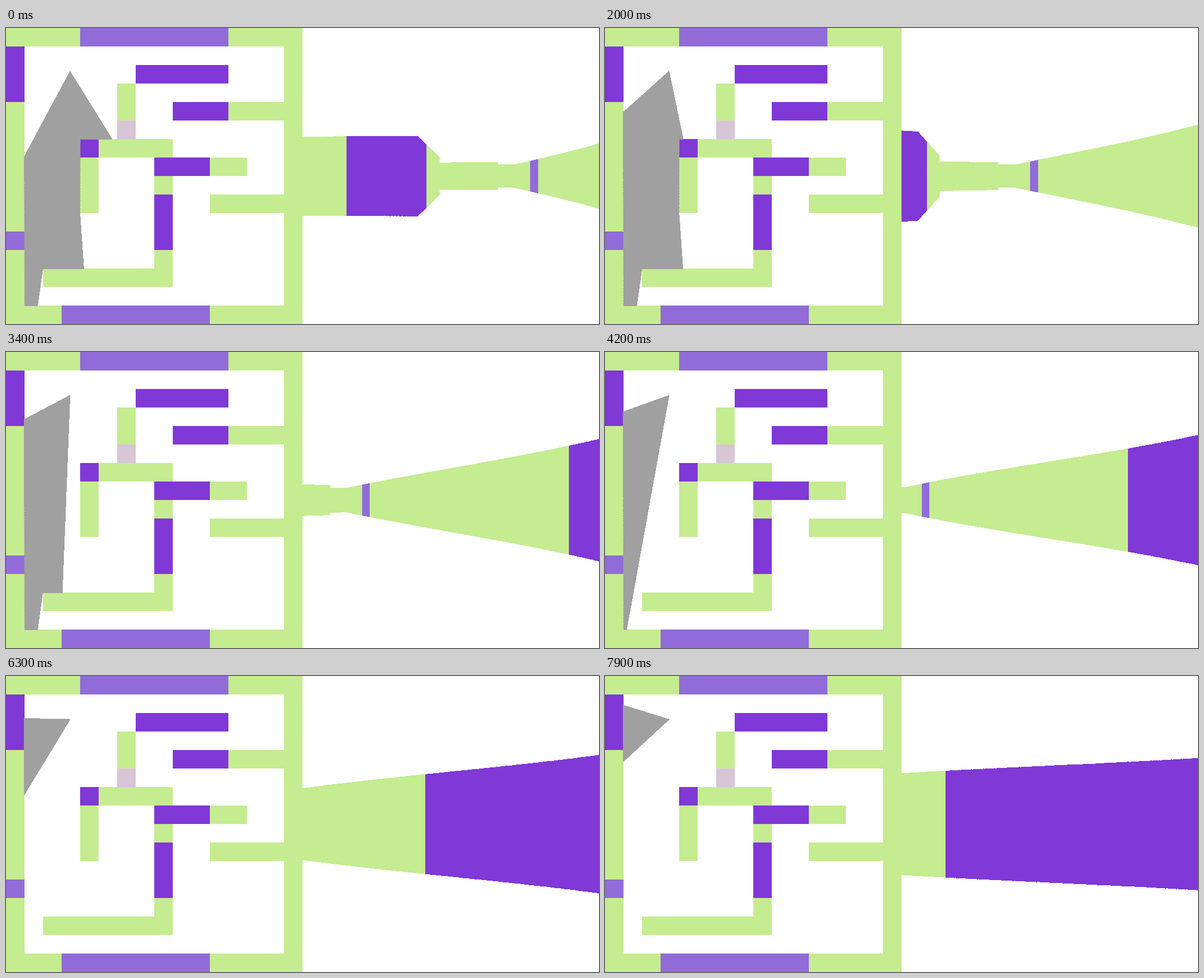
These frames come from a looping animation (1024x512 px, 8000 ms). An HTML page with a canvas:

```html
<!DOCTYPE html>
<html lang="en">
<head>
<meta charset="utf-8">
<title>Raycaster</title>
<style>
html, body { margin: 0; width: 100%; height: 100%; overflow: hidden; background: #fff; }
canvas { display: block; }
</style>
</head>
<body>
<canvas id="view" width="1024" height="512"></canvas>
<script>
const W = 1024, H = 512, HALF = W / 2, CELL = 32, SIZE = 16;
const STEP_MS = 100, STEPS = 80, FOV = Math.PI / 3;
const player = { x: 3.456, y: 2.345, angle: 1.523 };

const map = [
  '0000222222220000',
  '1              0',
  '1      11111   0',
  '1     0        0',
  '0     0  1110000',
  '0     3        0',
  '0   10000      0',
  '0   0   11100  0',
  '0   0   0      0',
  '0   0   1  00000',
  '0       1      0',
  '2       1      0',
  '0       0      0',
  '0 0000000      0',
  '0              0',
  '0002222222200000'
].join('');

const rgb = (r, g, b) => (255 << 24 | b << 16 | g << 8 | r) >>> 0;
const walls = [rgb(197, 236, 144), rgb(128, 56, 214), rgb(145, 108, 216), rgb(216, 197, 214)];
const GRAY = rgb(160, 160, 160), WHITE = rgb(255, 255, 255);

const ctx = document.getElementById('view').getContext('2d');
const image = ctx.createImageData(W, H);
const pixels = new Uint32Array(image.data.buffer);

function fill(buf, x, y, w, h, color) {
  const bottom = Math.min(H, y + h);
  for (let row = Math.max(0, y); row < bottom; row++) {
    buf.fill(color, row * W + x, row * W + x + w);
  }
}

// The floor plan never changes, so it is painted once.
const plan = new Uint32Array(W * H).fill(WHITE);
for (let i = 0; i < map.length; i++) {
  if (map[i] !== ' ') {
    fill(plan, i % SIZE * CELL, Math.floor(i / SIZE) * CELL, CELL, CELL, walls[map[i]]);
  }
}

function castRay(column, heading) {
  const offset = FOV * (column / HALF - 0.5);
  const dx = Math.cos(heading + offset), dy = Math.sin(heading + offset);
  for (let t = 0; t < 20; t = Math.fround(t + 0.01)) {
    const x = player.x + t * dx, y = player.y + t * dy;
    pixels[(x * CELL | 0) + (y * CELL | 0) * W] = GRAY;
    const cell = map[(x | 0) + (y | 0) * SIZE];
    if (cell !== ' ') {
      const height = Math.floor(H / (t * Math.cos(offset)));
      fill(pixels, HALF + column, H / 2 - (height >> 1), 1, height, walls[cell]);
      return;
    }
  }
}

function render(step) {
  pixels.set(plan);
  const heading = player.angle + (step + 1) * Math.PI / 180;
  for (let i = 0; i < HALF; i++) castRay(i, heading);
  ctx.putImageData(image, 0, 0);
}

let shown = -1;
function tick() {
  const step = Math.floor(performance.now() / STEP_MS) % STEPS;
  if (step !== shown) render(shown = step);
  requestAnimationFrame(tick);
}
tick();
</script>
</body>
</html>
```
